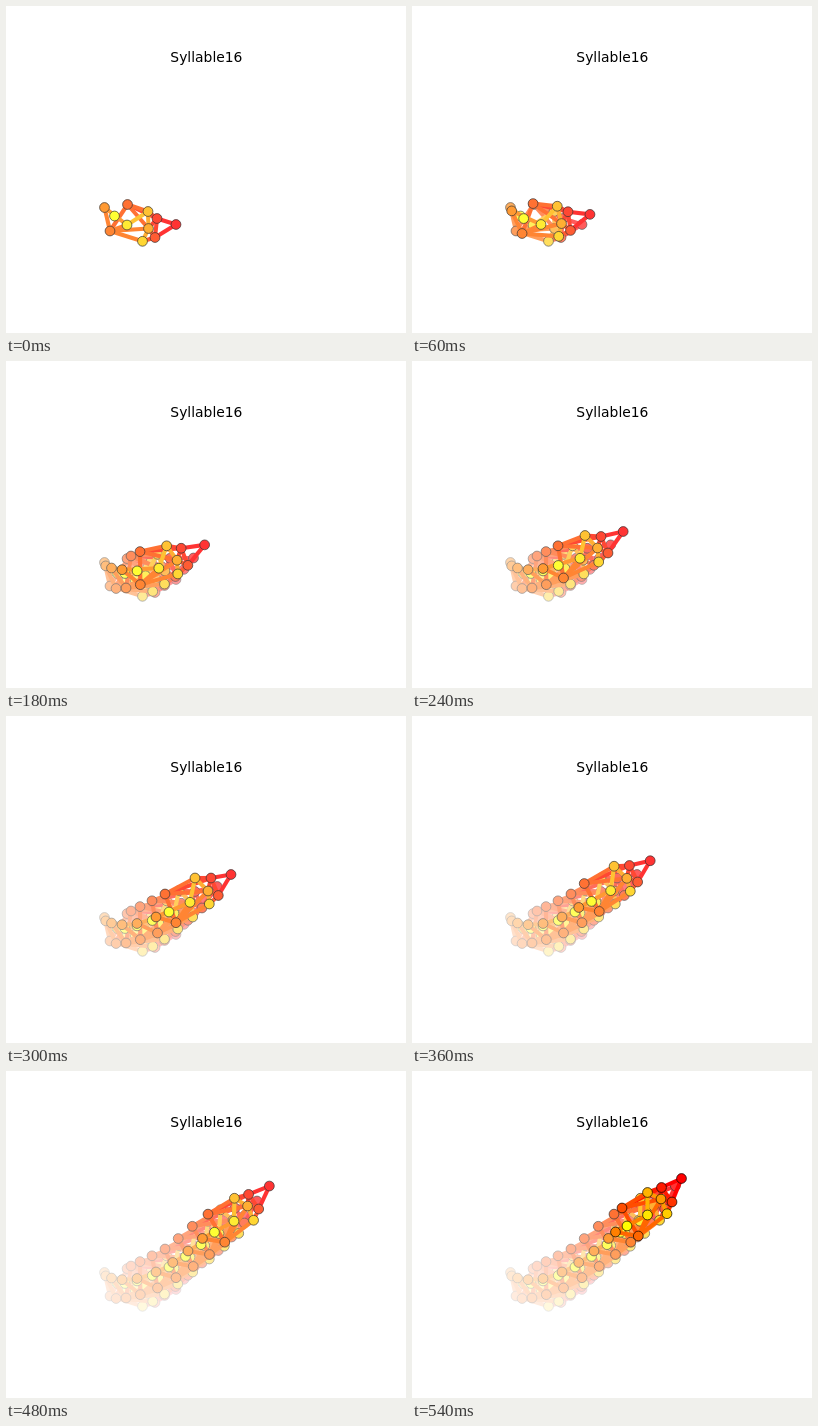
An HTML page with a canvas that plays this animation: 400x327 px, repeating every 0.6 s.

```html
<!DOCTYPE html>
<html lang="en">
<head>
<meta charset="utf-8">
<title>Syllable16</title>
<style>
  html, body { margin: 0; width: 100%; height: 100%; overflow: hidden; background: #fff; }
  canvas, svg { position: absolute; left: 0; top: 0; width: 400px; height: 327px; }
  text { font: 13.89px "DejaVu Sans", sans-serif; text-anchor: middle; }
</style>
</head>
<body>
<canvas id="stage" width="400" height="327"></canvas>
<svg viewBox="0 0 400 327"><text x="200.4" y="56">Syllable16</text></svg>
<script>
const ctx = document.getElementById('stage').getContext('2d');
const STEP = 60, COUNT = 10;

// Key poses, eleven x,y pairs each, and the step at which each is reached
const times = [0, 2, 4, 5, 7, 8.5];
const poses = [
  [170, 218.5, 151, 212.5, 149, 231.5, 121.5, 198.5, 104, 225, 98.5, 201.5,
   142.5, 222.5, 142, 205.5, 136.5, 235.3, 121, 219, 108.5, 210],
  [187.5, 197, 164, 197.3, 169.5, 215.5, 125, 195, 120, 227, 105.5, 207,
   159, 210, 151.5, 193.3, 158.5, 223, 139.5, 214.7, 119, 212.5],
  [211.2, 170.5, 189, 175.5, 196, 192, 146, 184.8, 151.5, 217, 131, 207.5,
   185.5, 187, 173, 174.5, 186.7, 201, 168, 197.3, 146.3, 204.5],
  [225, 158.5, 205, 162, 212.3, 179.5, 159, 178, 170, 206.7, 150, 201,
   202, 175, 189, 162, 203.3, 188, 184, 186.3, 163, 196],
  [251, 130, 229, 137, 238.3, 152, 186.3, 155.3, 203.5, 183.5, 182, 180,
   227, 149, 214.5, 138.8, 232.7, 162.4, 213, 162.5, 195, 173.6],
  [269.5, 107.5, 249.5, 116.5, 260, 131, 210, 137, 226.3, 165, 203.5, 161,
   249, 128, 235.5, 121.5, 255, 142.7, 235.5, 144, 215, 155]
];
const edges = '01 02 12 13 16 17 26 28 34 36 37 45 46 48 49 59 67 68 79'.split(' ');
const colors = Array.from({ length: 11 }, (_, i) => `rgb(255,${Math.round(i * 25.5)},0)`);

const chord = (k, c) => (poses[k + 1][c] - poses[k][c]) / (times[k + 1] - times[k]);

function slope(k, c) {
  const last = times.length - 1;
  if (k === 0) return 1.5 * chord(0, c) - 0.5 * chord(1, c);
  if (k === last) return chord(last - 1, c);
  const a = times[k] - times[k - 1], b = times[k + 1] - times[k];
  return (b * chord(k - 1, c) + a * chord(k, c)) / (a + b);
}

// Cubic Hermite interpolation of all coordinates
function poseAt(step) {
  const t = Math.min(step, times[times.length - 1]);
  let k = 0;
  while (k < times.length - 2 && t >= times[k + 1]) k++;
  const h = times[k + 1] - times[k], u = (t - times[k]) / h, v = 1 - u;
  return poses[k].map((p, c) =>
    v * v * (1 + 2 * u) * p + u * u * (1 + 2 * v) * poses[k + 1][c] +
    h * u * v * (v * slope(k, c) - u * slope(k + 1, c)));
}

const track = Array.from({ length: COUNT }, (_, i) => poseAt(i));

function drawPose(p) {
  ctx.lineWidth = 4.1;
  for (const [a, b] of edges) {
    ctx.strokeStyle = colors[a];
    ctx.beginPath();
    ctx.moveTo(p[2 * a], p[2 * a + 1]);
    ctx.lineTo(p[2 * b], p[2 * b + 1]);
    ctx.stroke();
  }
  ctx.lineWidth = 0.7;
  ctx.strokeStyle = '#000';
  colors.forEach((color, i) => {
    ctx.fillStyle = color;
    ctx.beginPath();
    ctx.arc(p[2 * i], p[2 * i + 1], 4.9, 0, 2 * Math.PI);
    ctx.fill();
    ctx.stroke();
  });
}

function veil(alpha) {
  ctx.fillStyle = `rgba(255,255,255,${alpha})`;
  ctx.fillRect(0, 0, 400, 327);
}

// Every pose but the last is followed by a thin white veil
function draw(step) {
  veil(1);
  for (let i = 0; i <= step; i++) {
    drawPose(track[i]);
    if (i < COUNT - 1) veil(0.2);
  }
}

let start, shown = -1;
function tick() {
  const now = performance.now();
  start ??= now;
  const step = Math.floor((now - start) / STEP) % COUNT;
  if (step !== shown) draw(shown = step);
  requestAnimationFrame(tick);
}
tick();
</script>
</body>
</html>
```
